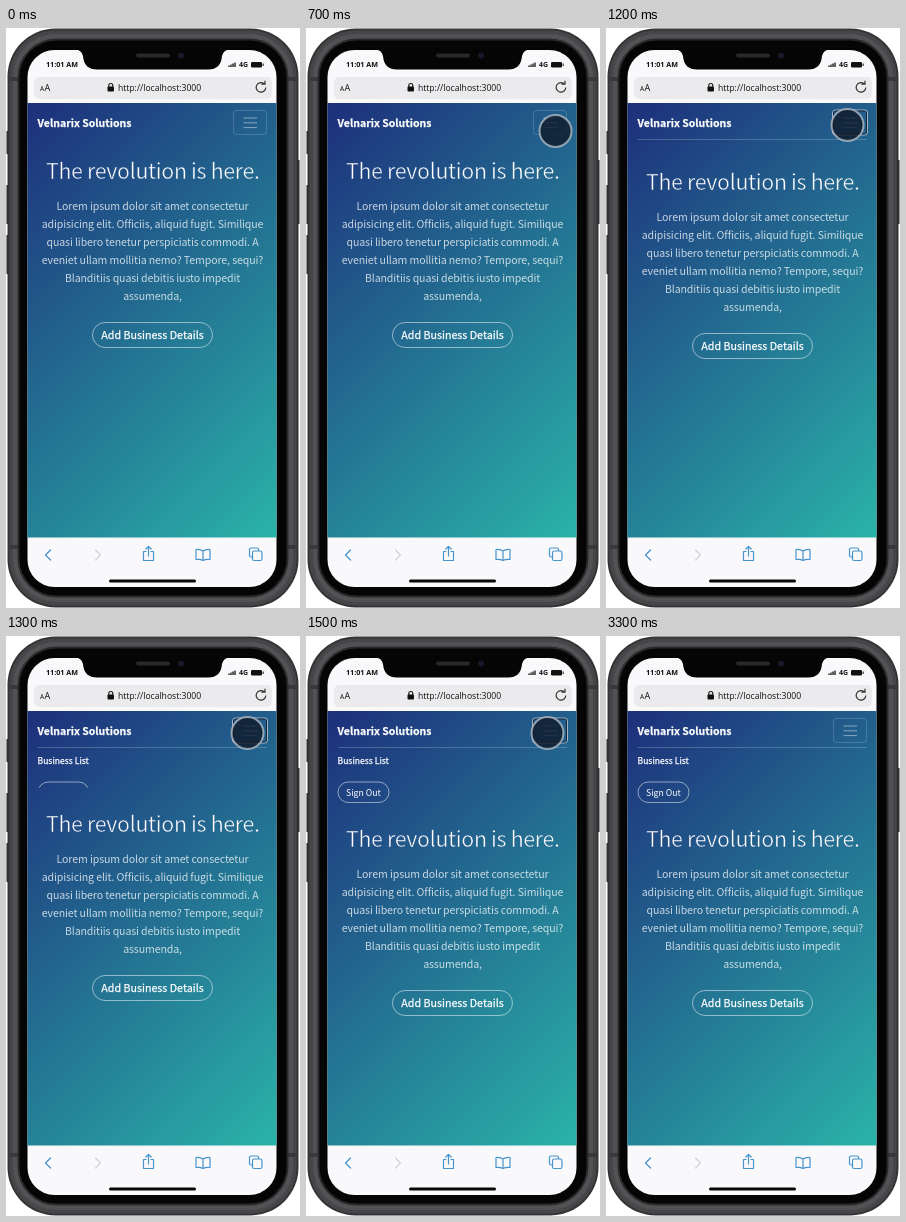
Write an HTML page that moves like this. It is 294 by 580 pixels and loops after 3.4 s.

```html
<!DOCTYPE html>
<html lang="en">
<head>
<meta charset="utf-8">
<title>Phone menu</title>
<style>
html, body { margin: 0; width: 100%; height: 100%; overflow: hidden; background: #fff; }
svg { display: block; }
text { font-family: "Noto Sans CJK JP", "Noto Sans CJK SC", "Noto Sans CJK", "Source Sans Pro", sans-serif; fill: #fff; }
.ui { font-family: "Open Sans", "Noto Sans", sans-serif; fill: #111; }
.mid { text-anchor: middle; }
.semi { stroke: #fff; stroke-width: .25px; }
/* a stroke in the background colours thins the letters */
.thin { stroke: url(#sky); stroke-width: .45px; letter-spacing: -.35px; }
.pill { fill: none; stroke: #fff; stroke-opacity: .5; }
.icon { fill: none; stroke: #4793cc; stroke-width: 1.2; stroke-linejoin: round; stroke-linecap: round; }
</style>
</head>
<body>
<svg width="294" height="580" viewBox="0 0 294 580">
  <defs>
    <linearGradient id="sky" gradientUnits="userSpaceOnUse" x1="-24" y1="121" x2="317.5" y2="462.5">
      <stop stop-color="#1d2f7b"/><stop offset="1" stop-color="#2ab3a9"/>
    </linearGradient>
    <clipPath id="screen"><rect x="21.5" y="22" width="249" height="537" rx="27"/></clipPath>
    <clipPath id="page"><rect x="21.5" y="75" width="249" height="434.5"/></clipPath>
    <clipPath id="fold"><rect id="foldBox" x="22" y="107" width="249" height="0"/></clipPath>
  </defs>

  <!-- phone body -->
  <path d="M1.5 103V126M1.5 157V196M1.5 207V246M292.5 132V196" stroke="#2b2b2d" stroke-width="2"/>
  <rect x="1.5" y=".5" width="291" height="579" rx="48" fill="#343436"/>
  <rect x="3.5" y="2.5" width="287" height="575" rx="46" fill="#464649"/>
  <rect x="7" y="6" width="280" height="568" rx="43" fill="#525255"/>
  <path d="M2 51H13M281 51H292M2 519H13M281 519H292" stroke="#39393b" stroke-width="4"/>
  <rect x="12.5" y="11.5" width="269" height="557" rx="38" fill="#050505" stroke="#29292b" stroke-width="2"/>

  <g clip-path="url(#screen)">
    <rect x="21" y="22" width="250" height="537" fill="#f9f9fb"/>
    <rect x="28" y="49" width="238" height="22" rx="5" fill="#ebebed"/>
    <rect x="21" y="75" width="250" height="434.5" fill="url(#sky)"/>
  </g>
  <path d="M68 21Q76 22 77 28Q78 41.5 91 41.5H202Q215 41.5 216 28Q217 22 225 21Z" fill="#050505"/>
  <rect x="130" y="25.5" width="34" height="4" rx="2" fill="#28282b"/>
  <circle cx="175" cy="27.5" r="3" fill="#17182a"/>

  <!-- status and address bars -->
  <text class="ui" x="40" y="39" font-size="7.2" font-weight="700">11:01 AM</text>
  <path d="M223 39V37.5M225 39V36.5M227 39V35.5M229 39V34.5" stroke="#111" stroke-width="1.3"/>
  <text class="ui" x="233" y="39" font-size="6.9" font-weight="700">4G</text>
  <rect x="245" y="34" width="11" height="5.5" rx="1.3" fill="#111"/>
  <path d="M257.2 35.5V38" stroke="#111"/>
  <text class="ui" x="34" y="63" font-size="6.5">A</text>
  <text class="ui" x="38.5" y="63" font-size="9">A</text>
  <rect x="101.5" y="58.5" width="6.5" height="5" rx="1" fill="#111"/>
  <path d="M102.8 59V57.5A2 2 0 0 1 106.8 57.5V59" fill="none" stroke="#111" stroke-width="1.1"/>
  <text class="ui" x="112" y="62.5" font-size="8.6">http://localhost:3000</text>
  <path d="M258.6 56.2A4.8 4.8 0 1 0 259.8 59.5M255.5 56.2H259V52.8" fill="none" stroke="#333" stroke-width="1.2"/>

  <!-- tool bar -->
  <g class="icon">
    <path d="M44.5 522L39.5 527L44.5 532"/>
    <path d="M89.5 522L94.5 527L89.5 532" stroke="#d0d4d8"/>
    <path d="M140 523.5H137.5V532.5H147.5V523.5H145M142.5 528V518.5M139.8 521L142.5 518.3L145.2 521"/>
    <path d="M197 523Q194 520.8 190 521.5V531.5Q194 530.8 197 532.5Q200 530.8 204 531.5V521.5Q200 520.8 197 523V532.5"/>
    <rect x="246.5" y="523" width="9.5" height="9.5" rx="1.8"/>
    <path d="M246 529H245Q243.5 529 243.5 527.5V521.5Q243.5 520 245 520H251Q252.5 520 252.5 521.5V522.5"/>
  </g>
  <rect x="103" y="551.5" width="87" height="3" rx="1.5" fill="#080808"/>

  <!-- web page -->
  <g clip-path="url(#page)">
    <text class="semi" x="31.5" y="98.7" font-size="10.5" font-weight="700">Velnarix Solutions</text>
    <rect x="227.5" y="82.5" width="33" height="24" rx="3" fill="none" stroke="#fff" stroke-opacity=".17"/>
    <path d="M237.5 90H251M237.5 94.8H251M237.5 99.6H251" stroke="#fff" stroke-opacity=".45"/>
    <g id="focus" fill="none">
      <rect x="226.5" y="82" width="35" height="25" rx="3" stroke="#d5d6d8" stroke-opacity=".75"/>
      <rect x="227.5" y="83" width="33" height="23" rx="2" stroke="#17213a"/>
    </g>
    <g clip-path="url(#fold)">
      <path d="M32 111.5H261" stroke="#fff" stroke-opacity=".2"/>
      <text class="semi" x="31.5" y="128" font-size="8.6">Business List</text>
      <rect class="pill" x="32" y="146" width="51" height="20.5" rx="10.25"/>
      <text x="40" y="159.7" font-size="8.7">Sign Out</text>
    </g>
    <g id="content">
      <text class="mid thin" x="146.8" y="151" font-size="21.4">The revolution is here.</text>
      <g id="lines" font-size="10.6" letter-spacing="-.12" fill-opacity=".75"></g>
      <rect class="pill" x="86.5" y="294.5" width="120" height="25" rx="12.5"/>
      <text class="mid semi" x="146.5" y="311" font-size="10.7">Add Business Details</text>
    </g>
    <g id="touch">
      <circle r="16" fill="#101c2b" fill-opacity=".82" stroke="#aeb9c4" stroke-opacity=".8" stroke-width="2"/>
    </g>
  </g>
</svg>
<script>
const $ = id => document.getElementById(id);
const LOOP = 3400, STEP = 100, MENU = 60;

$("lines").innerHTML = [
  "Lorem ipsum dolor sit amet consectetur",
  "adipisicing elit. Officiis, aliquid fugit. Similique",
  "quasi libero tenetur perspiciatis commodi. A",
  "eveniet ullam mollitia nemo? Tempore, sequi?",
  "Blanditiis quasi debitis iusto impedit",
  "assumenda,"
].map((s, i) => `<text class="mid" x="146.5" y="${182 + 18 * i}">${s}</text>`).join("");

// time, x, y of the touch pointer
const path = [
  [300, 262, 140], [400, 258, 122], [500, 255, 111],
  [700, 249.5, 103], [800, 244, 98], [900, 241.5, 97], [1600, 246, 90]
];

// CSS "ease": cubic-bezier(.25, .1, .25, 1)
function ease(x) {
  if (x <= 0 || x >= 1) return x <= 0 ? 0 : 1;
  const curve = (a, b, s) => 3 * a * s * (1 - s) ** 2 + 3 * b * s * s * (1 - s) + s ** 3;
  let lo = 0, hi = 1;
  for (let i = 0; i < 20; i++) {
    const s = (lo + hi) / 2;
    if (curve(.25, .25, s) < x) lo = s; else hi = s;
  }
  return curve(.1, 1, lo);
}

const show = (id, on) => $(id).setAttribute("visibility", on ? "visible" : "hidden");

function draw(now) {
  const t = Math.floor(now % LOOP / STEP) * STEP;
  const drop = MENU * ease((t - 1152) / 330);
  $("foldBox").setAttribute("height", drop);
  $("content").setAttribute("transform", `translate(0 ${Math.round(drop)})`);
  show("focus", t >= 1100 && t < 3300);
  show("touch", t >= 300 && t < 1700);
  const spot = path.filter(p => p[0] <= t).pop() || path[0];
  $("touch").setAttribute("transform", `translate(${spot[1]} ${spot[2]})`);
}

const start = performance.now();
function tick() {
  draw(performance.now() - start);
  requestAnimationFrame(tick);
}
tick();
</script>
</body>
</html>
```
